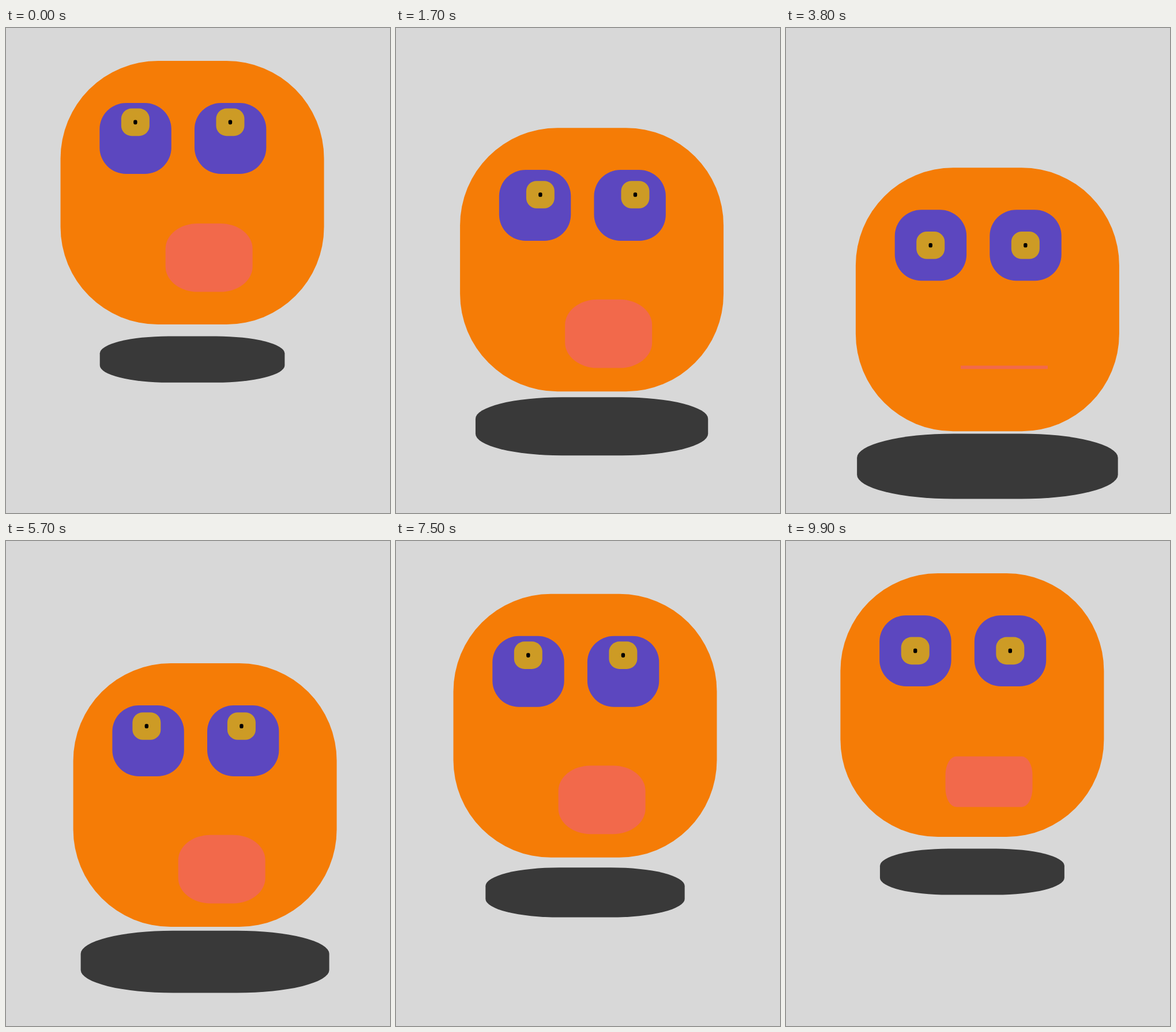
An HTML page with a canvas for the animation above (10 s loop, 666 px wide and 841 px high).

```html
<!DOCTYPE html>
<html lang="en">
<head>
<meta charset="utf-8">
<title>Bouncing face</title>
<style>
html, body { margin: 0; width: 100%; height: 100%; overflow: hidden; background: #d8d8d8; }
canvas { display: block; }
</style>
</head>
<body>
<canvas id="stage" width="666" height="841"></canvas>
<script>
const ctx = document.getElementById('stage').getContext('2d');
const LOOP = 10000, STEP = 100, LEAD = 60;
const SIZE = 457, ROUND = 0.37;
const MOVE = 0.8; // seconds a look or a mouth change takes

// pupil directions, in units of REACH
const REACH = 28.1;
const CENTRE = [0, 0], UP = [0, -1], RIGHT = [1, 0], LEFT = [-1, 0], ROLLED = [0, -4.42];
const looks = [[0, UP], [1.585, RIGHT], [2.9, CENTRE], [4.2, LEFT], [5.25, UP], [8, ROLLED], [9.15, CENTRE]];

// mouth poses: height on the face, openness
const RAISED = [341.2, 1], OPEN = [357, 1], SHUT = [345.5, 0], LOW = [367, 1];
const poses = [[0, RAISED], [0.4, OPEN], [3.28, SHUT], [4.4, OPEN], [8, SHUT], [9.606, LOW]];

// cubic-bezier(.25, .1, .25, 1)
function ease(x) {
  if (x <= 0) return 0;
  if (x >= 1) return 1;
  let lo = 0, hi = 1;
  for (let i = 0; i < 24; i++) {
    const u = (lo + hi) / 2;
    if (0.75 * u * (1 - u) + u * u * u < x) lo = u; else hi = u;
  }
  const u = lo, v = 1 - u;
  return 0.3 * u * v * v + 3 * u * u * v + u * u * u;
}

// starts in the first state, then eases to each later one at its time
function follow(stops, s) {
  return stops.slice(1).reduce((now, [at, next]) => {
    const k = ease((s - at) / MOVE);
    return now.map((v, i) => v + (next[i] - v) * k);
  }, stops[0][1]);
}

function blob(cx, cy, w, h, color, rx = ROUND) {
  ctx.fillStyle = color;
  ctx.beginPath();
  ctx.roundRect(cx - w / 2, cy - h / 2, w, h, { x: w * rx, y: h * ROUND });
  ctx.fill();
}

function draw(ms) {
  const s = (ms + LEAD) / 1000;
  const drop = s < 5 ? ease(s / 5) : 1 - ease((s - 5) / 5);
  const x = 94.4 + 27.4 * drop;
  const y = 56 + 192.6 * drop;
  const mid = x + SIZE / 2;
  const shadow = SIZE * (0.7 + 0.3 * drop);

  ctx.fillStyle = '#d8d8d8';
  ctx.fillRect(0, 0, 666, 841);
  blob(mid, y + 517.6, shadow, shadow / 4, '#393939');
  blob(mid, y + SIZE / 2, SIZE, SIZE, '#f57c06');

  const [dx, dy] = follow(looks, s);
  const eyeY = y + 134.4;
  for (const eyeX of [x + 130, x + 294.6]) {
    const px = eyeX + dx * REACH - 0.2, py = eyeY + dy * REACH;
    blob(eyeX, eyeY, 124.4, 123, '#5c47bf');
    blob(px, py, 49, 47.6, '#cd9b25');
    blob(px, py, 6.4, 7.6, '#000');
  }

  const [mouthY, open] = follow(poses, s);
  blob(x + 257.6, y + mouthY, 151, 118.7 * open, '#f2694b', ROUND * open ** 3.6);
}

const start = performance.now();
function tick() {
  const t = Math.max(0, performance.now() - start) % LOOP;
  draw(Math.floor(t / STEP) * STEP);
  requestAnimationFrame(tick);
}
tick();
</script>
</body>
</html>
```
